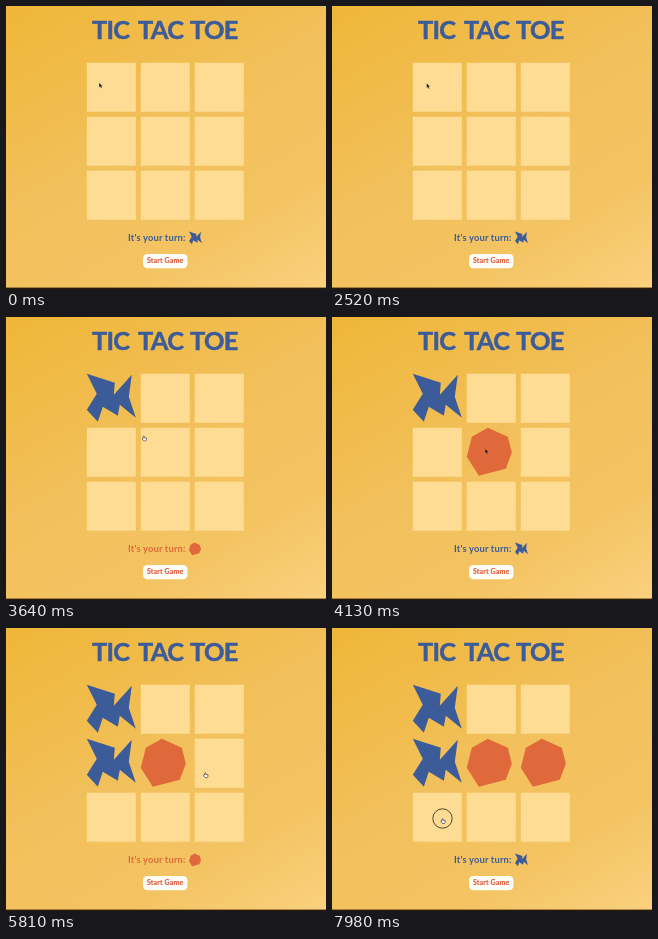
Recreate the animation shown at these times as an HTML page. Size 320 by 283 pixels, loop 8000 ms.

```html
<!DOCTYPE html>
<html lang="en">
<head>
<meta charset="utf-8">
<title>Tic Tac Toe</title>
<style>
  html, body { margin: 0; width: 100%; height: 100%; overflow: hidden; background: #f2bf55; }
  svg { display: block; width: 320px; height: 283px; }
  text { font-family: Lato, "Open Sans", sans-serif; font-weight: 700; }
  .title { font-size: 25.4px; font-weight: 900; letter-spacing: -.7px; fill: #3c5c99; stroke: #3c5c99; stroke-width: .5; }
  .turn { font-size: 9.4px; letter-spacing: .16px; }
  .start { font-size: 7px; letter-spacing: .13px; fill: #dc5b3d; stroke: #dc5b3d; stroke-width: .15; }
</style>
</head>
<body>
<svg viewBox="0 0 320 283">
  <defs>
    <linearGradient id="bg" gradientUnits="userSpaceOnUse" x1="0" y1="0" x2="203" y2="353">
      <stop offset="0" stop-color="#efb637"/>
      <stop offset=".45" stop-color="#f2c05b"/>
      <stop offset=".75" stop-color="#f4c463"/>
      <stop offset="1" stop-color="#fbd17f"/>
    </linearGradient>
  </defs>
  <rect width="320" height="283" fill="url(#bg)"/>
  <rect y="281.6" width="320" height="1.4" fill="#2b1a08"/>
  <g class="title">
    <text x="86" y="32.8">TIC</text>
    <text x="132" y="32.8">TAC</text>
    <text x="184" y="32.8">TOE</text>
  </g>
  <g id="board"></g>
  <g id="status">
    <text class="turn" x="122" y="235">It's your turn:</text>
    <polygon id="icon" transform="translate(183 225.5) scale(.265)"/>
  </g>
  <rect x="137" y="248" width="44.5" height="14.3" rx="4.5" fill="#fffdf8"/>
  <text class="start" x="141" y="257.3">Start Game</text>
  <g id="cursor">
    <circle id="ring" r="9.7" fill="none" stroke="#17130c" stroke-opacity=".75"/>
    <path id="arrow" d="M-.8-1.2V3.4L.3 2.5 1.1 4.3 1.9 3.9 1.1 2.2H2.5Z" fill="#111" stroke="#fff" stroke-opacity=".45" stroke-width=".3"/>
    <path id="hand" d="M-.5 4.5-1.6 2.6-.5 2.4V.4Q.1-.2.6.4V1.8L2.8 2.2 2.6 4.2 2 5H0Z" fill="#fff" stroke="#222" stroke-width=".6"/>
  </g>
</svg>
<script>
const LOOP = 8000, FADE = 210, PALE = [254, 220, 148];
const LEFT = 80.8, TOP = 56.7, PITCH = 54, SIZE = 49;
const SQUARE = `0,0 ${SIZE},0 ${SIZE},${SIZE} 0,${SIZE}`;
const MARKS = {
  x: { rgb: [60, 92, 153],
       pts: '0,0 28,9 27,21 45,1 42,23 49,44 33,31 31,42 16,33 11,48 0,36 10,20' },
  o: { rgb: [224, 105, 60],
       pts: '21,0 41,9 45,25 39,41 12,48 0,29 5,9' }
};
// cell, mark, moment of the click, moment the button goes down
const MOVES = [
  [0, 'x', 2630, 2560],
  [4, 'o', 3860, 3760],
  [3, 'x', 5130, 5040],
  [5, 'o', 7135, 7000]
];
const LAST_PRESS = 7910;
// start, end, x, y
const PATH = [
  [0, 0, 94, 78],
  [1260, 1330, 95.5, 78.5],
  [2880, 3150, 110, 95],
  [3500, 3740, 154, 133],
  [4480, 4960, 118, 137],
  [5390, 5950, 214, 146],
  [6300, 6440, 217, 149.5],
  [7220, 7770, 110.5, 190.5]
];

const $ = id => document.getElementById(id);
const cells = Array.from({ length: 9 }, (_, i) => {
  const p = document.createElementNS('http://www.w3.org/2000/svg', 'polygon');
  p.setAttribute('transform', `translate(${LEFT + i % 3 * PITCH} ${TOP + Math.floor(i / 3) * PITCH})`);
  return $('board').appendChild(p);
});

const clamp = v => Math.min(1, Math.max(0, v));
const ease = v => v * v * (3 - 2 * v);
const rgb = c => `rgb(${c.map(Math.round)})`;
const mix = (a, b, k) => a.map((v, i) => v + (b[i] - v) * k);
const show = (id, on) => $(id).setAttribute('visibility', on ? 'visible' : 'hidden');

function paint(el, pts, color) {
  el.setAttribute('points', pts);
  el.setAttribute('fill', rgb(color));
}

function pointer(t) {
  let [, , x, y] = PATH[0];
  for (const [a, b, px, py] of PATH.slice(1)) {
    const k = ease(clamp((t - a) / (b - a)));
    x += (px - x) * k;
    y += (py - y) * k;
  }
  return [x, y];
}

function draw(t) {
  const done = MOVES.filter(m => t >= m[2]);
  cells.forEach(c => paint(c, SQUARE, PALE));
  for (const [cell, mark, at] of done) {
    const { pts, rgb: color } = MARKS[mark];
    paint(cells[cell], pts, mix(PALE, color, ease(clamp((t - at) / FADE))));
  }

  const next = MARKS[done.length % 2 ? 'o' : 'x'];
  $('status').setAttribute('fill', rgb(next.rgb));
  $('icon').setAttribute('points', next.pts);

  const [x, y] = pointer(t);
  const dx = x - LEFT, dy = y - TOP;
  const cell = Math.floor(dy / PITCH) * 3 + Math.floor(dx / PITCH);
  const inside = dx % PITCH < SIZE && dy % PITCH < SIZE;
  const free = !done.some(m => m[0] === cell);
  const pressed = t >= LAST_PRESS || MOVES.some(m => t >= m[3] && t < m[2]);
  const hand = t > MOVES[0][3] && inside && free;
  $('cursor').setAttribute('transform', `translate(${x} ${y})`);
  show('ring', pressed);
  show('hand', hand);
  show('arrow', !hand);
}

const begin = performance.now();
function tick() {
  draw((performance.now() - begin) % LOOP);
  requestAnimationFrame(tick);
}
tick();
</script>
</body>
</html>
```
